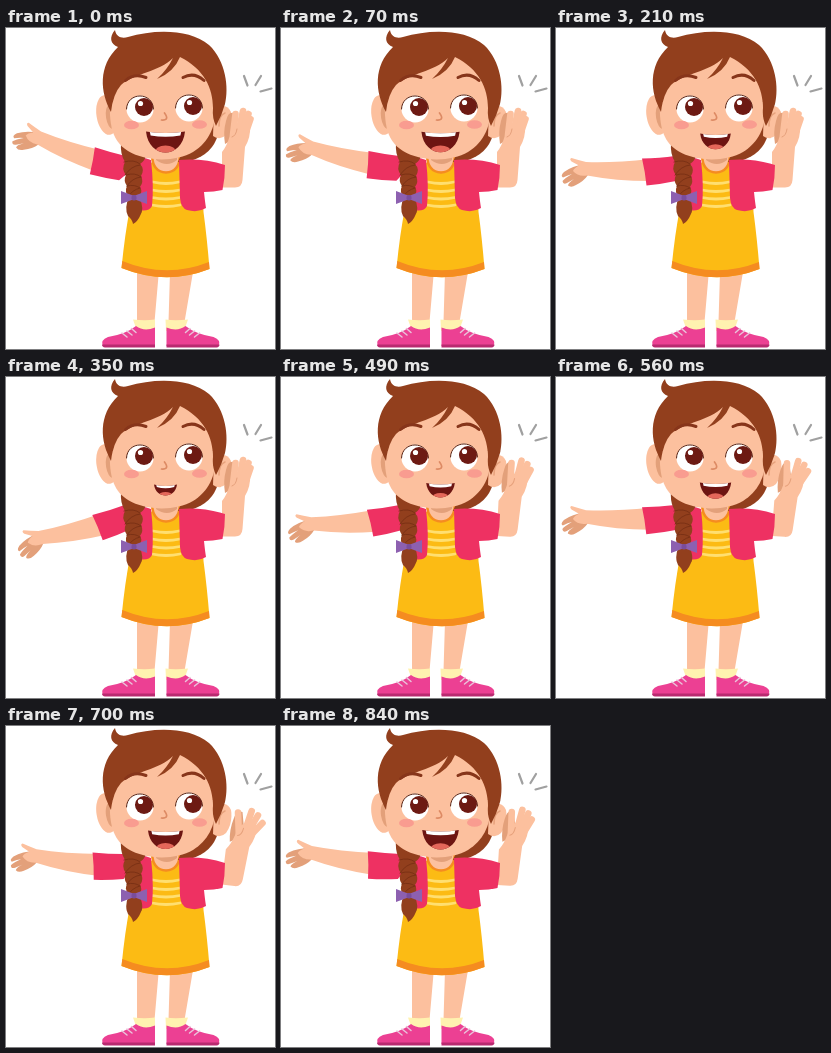
Write an HTML page that moves like this. It is 269x321 px and loops after 1.12 s.

```html
<!DOCTYPE html>
<html lang="en">
<head>
<meta charset="utf-8">
<title>Waving girl</title>
<style>
  html, body { margin: 0; width: 100%; height: 100%; overflow: hidden; background: #fff; }
  svg { display: block; width: 100vw; height: 100vh; }
  .skin { fill: #fcc09e; }
  .shade { fill: #e3a07a; }
  .hair { fill: #923f1d; }
  .pink { fill: #ee3162; }
  .line { fill: none; stroke-linecap: round; stroke-linejoin: round; }
  .finger { stroke: #fcc09e; stroke-width: 6.6; }
  .crease { stroke: #e6a17c; stroke-width: 1; }
  .strand { stroke: #7b3115; stroke-width: 1; }
  .brow { stroke: #87351a; stroke-width: 3; }
  .lash { stroke: #5a2413; stroke-width: 1; }
</style>
</head>
<body>
<svg viewBox="0 0 269 321">
  <defs>
    <clipPath id="lips"><path class="mouth"/></clipPath>
  </defs>

  <!-- call marks -->
  <path class="line" stroke="#a0a0a0" stroke-width="2.200" d="M238 48L241.500 57.500M255 48L249.500 57M265.500 60.500L254.500 63.500"/>

  <!-- legs and shoes -->
  <path class="skin" d="M131 242H153L148.500 294H131ZM164 244H187L178.500 294H162.500Z"/>
  <path fill="#fff2b0" d="M127 291.500Q139 293 149 291.500V303H131ZM159.500 291.500Q169 293 182 291.500L178 303H160Z"/>
  <g id="shoe">
    <path fill="#ec4093" d="M130 298Q138 304 149 299.500V318H97Q94 312 102 309Q120 306 130 298Z"/>
    <path fill="#b92a70" d="M96 316.500H149V319.500H99Q96 319 96 316.500Z"/>
    <path class="line" stroke="#e8c4da" stroke-width="1.500" d="M116 305L121 309M121 303L126 307M125.500 300.500L130 304.500"/>
  </g>
  <use href="#shoe" transform="matrix(-1 0 0 1 309.500 0)"/>

  <!-- dress -->
  <path fill="#fcbb14" d="M131 140L147 134H173L196 145L197.500 184Q201 210 203.500 241Q160 258 115.500 240Q119 205 124 180Z"/>
  <path fill="#f58c20" d="M116.300 233Q160 251 203 234L203.500 241Q160 258 115.500 240Z"/>
  <path class="line" stroke="#ffdf70" stroke-width="2.800" d="M147 154Q160 157 173 154M146 162Q160 165 174 162M146 169.500Q160 172.500 174 169.500M146 177Q160 180 174 177"/>
  <path class="skin" stroke="#f58c20" stroke-width="2.500" d="M146 128H174Q173 144 160 144.500Q147 144 146 128Z"/>
  <path class="shade" d="M150 126H171V132Q161 140 150 132Z"/>

  <!-- jacket, pointing arm -->
  <path class="pink" d="M116 130Q130 126 145 132Q148 158 146 178Q143 184 133 182L127 178L122 152Z"/>
  <g id="arm">
    <path class="shade" d="M29 136Q16 138 8 144Q4 148 7 149.500Q12 147 16 146Q9 150 6.500 153Q7 157 11 155L18 151Q12 155 12 157.500Q15 160 20 157Q28 153 32 147Z"/>
    <path class="skin" d="M94 131Q58 135 30 134Q22 132 15.500 130Q13 131 15.500 133.500L23 137.500Q18 140 17 143Q22 149 31 147.500Q60 153 94 153Z"/>
    <path class="pink" d="M86 130.500Q104 130 119 128L127 141L120 153Q106 156 90.500 157.500Q89 143 86 130.500Z"/>
  </g>

  <!-- hair behind and braid -->
  <path class="hair" d="M198 75L214 96Q212 119 195 128.500Q183 135 172 134Z"/>
  <path class="hair" d="M115 115Q124 121 140 127Q139 133 134 136Q139 141 135 148Q138 154 134 159Q137 164 133 169Q139 181 134 188Q132 193 127 196Q126 191 122 188Q118 180 123 169Q118 164 121 158Q117 153 120 147Q115 141 119 134Q114 126 115 115Z"/>
  <path class="line strand" d="M118 134Q128 131 134 136M119 147Q125 138 134 137M120 147Q129 144 135 149M121 158Q126 150 135 149M121 158Q129 156 134 160M122 169Q126 162 134 160"/>
  <path fill="#8d60b0" d="M115 163L127 167.500V171.500L115 176ZM141 163L129 167.500V171.500L141 176Z"/>
  <rect fill="#7a4d9c" x="125.500" y="167" width="5" height="5.500" rx="2"/>

  <!-- head -->
  <ellipse class="skin" cx="101" cy="87" rx="10.500" ry="20" transform="rotate(-9 101 87)"/>
  <path class="skin" d="M208 82Q220 73 225 84Q227 97 220 107Q214 113 207 108Z"/>
  <ellipse class="shade" cx="105" cy="89" rx="5" ry="12" transform="rotate(-9 105 89)"/>
  <path class="line" stroke="#e6a17c" stroke-width="1.500" d="M219 85Q213 87 213 98"/>
  <path class="skin" d="M105 60C102 92 104 112 122 123C140 134 170 134 187 124C203 114 211 98 210 72C207 2 116 2 105 60Z"/>
  <path class="hair" d="M105 84C94 64 92 38 112 19C104 16 103 9 109 2C110 9 116 11 122 9C149 1 184 1 203 17C220 33 223 60 219 76Q216 87 210 98Q206 90 207 80C207 60 198 41 174 29Q168 44 151 51Q161 42 167 30C153 44 129 45 115 57Q107 66 105 84Z"/>
  <path class="line brow" d="M119.500 52.500Q128 45 140 49.500M177 49.500Q188 43.500 198 52.500"/>
  <g id="eye">
    <ellipse cx="134" cy="81" rx="13.500" ry="13.500" fill="#fff"/>
    <path class="line lash" d="M120.500 81C121 63.500 147 63.500 147.500 81"/>
    <circle cx="138" cy="79" r="9" fill="#6d1a13"/>
    <circle cx="134.500" cy="75.500" r="2.600" fill="#fff"/>
  </g>
  <use href="#eye" x="49" y="-1"/>
  <path class="line" stroke="#dd8a64" stroke-width="1.700" d="M158.500 85Q164 92.500 155.500 92"/>
  <ellipse cx="125.500" cy="97" rx="7.500" ry="4.300" fill="#f99c90"/>
  <ellipse cx="193.500" cy="96.500" rx="7.500" ry="4.300" fill="#f99c90"/>
  <path class="mouth" fill="#6d1512"/>
  <g clip-path="url(#lips)">
    <path id="teeth" fill="#fff"/>
    <ellipse id="tongue" cx="159.500" fill="#e4675a"/>
  </g>

  <!-- raised arm -->
  <g id="wave">
    <path class="shade" d="M219 116Q217 104 220 93Q222 83 228 85L233 108Z"/>
    <path class="skin" d="M216 159.500V124Q221 118 224 107Q228 95 236 94L244 97Q245 109 239 119L236.500 152Q236 159.500 229 159.500Z"/>
    <g id="fingers"></g>
    <path class="line crease" d="M226 109Q230 108 231 101"/>
  </g>
  <path class="pink" d="M173 132Q197 130 219 137Q219 150 216.500 162Q208 164 198 164Q199 174 200 180Q192 185 181 182Q175 180 174 170Z"/>
</svg>
<script>
const STEP = 70, LOOP = 1120, LAST = 12;
const $ = id => document.getElementById(id);

// [step, value] pairs, linear in between
const armKeys = [[0, 20], [3, 0], [5, -13], [9, 5], [10, 7], [12, 9]];
const mouthKeys = [[0, 1], [1, .95], [5, 0], [9, .7], [12, .85]];
const waveKeys = [[0, 0], [5, 0], [10, 1], [12, .5]];

// base x, base y, tip x, tip y, fan angle
const fingers = [
  [227, 107, 229.5, 86, -16],
  [233, 102, 237, 83, 0],
  [236, 104, 242.5, 86, 4],
  [239, 107, 244.5, 91, 18]
].map(([x, y, tx, ty, fan]) => {
  const el = document.createElementNS('http://www.w3.org/2000/svg', 'path');
  el.setAttribute('d', `M${x} ${y}L${tx} ${ty}`);
  el.setAttribute('class', 'line finger');
  $('fingers').append(el);
  return { el, x, y, fan };
});

function valueAt(keys, k) {
  const i = Math.max(1, keys.findIndex(p => p[0] >= k));
  const [k0, a] = keys[i - 1], [k1, b] = keys[i];
  return a + (b - a) * (k - k0) / (k1 - k0);
}

const turn = (el, deg, x, y) => el.setAttribute('transform', `rotate(${deg} ${x} ${y})`);

function drawMouth(open) {
  const cx = 159.5, w = 11.5 + 8 * open, top = 107.5 - 4 * open, low = 118.5 + 6 * open;
  const dip = (4 * low - top) / 3;
  const d = `M${cx - w} ${top}Q${cx} ${top + 3} ${cx + w} ${top}` +
    `C${cx + w * .85} ${dip} ${cx - w * .85} ${dip} ${cx - w} ${top}Z`;
  document.querySelectorAll('.mouth').forEach(p => p.setAttribute('d', d));
  const bite = top + 2.5 + 1.5 * open, edge = w * .82;
  $('teeth').setAttribute('d',
    `M${cx - edge} ${top - 1}H${cx + edge}L${cx + edge * .93} ${bite}Q${cx} ${bite + 2.5} ${cx - edge * .93} ${bite}Z`);
  const tongue = $('tongue');
  tongue.setAttribute('cy', low);
  tongue.setAttribute('rx', 7 + 4 * open);
  tongue.setAttribute('ry', 3.5 + 3.5 * open);
}

function draw(k) {
  turn($('arm'), valueAt(armKeys, k), 119, 133);
  drawMouth(valueAt(mouthKeys, k));
  const wave = valueAt(waveKeys, k);
  turn($('wave'), 7 * wave, 224, 155);
  fingers.forEach(f => turn(f.el, f.fan * wave, f.x, f.y));
}

let shown = -1;
function tick() {
  const k = Math.min(LAST, Math.floor(performance.now() % LOOP / STEP));
  if (k !== shown) draw(shown = k);
  requestAnimationFrame(tick);
}
tick();
</script>
</body>
</html>
```
